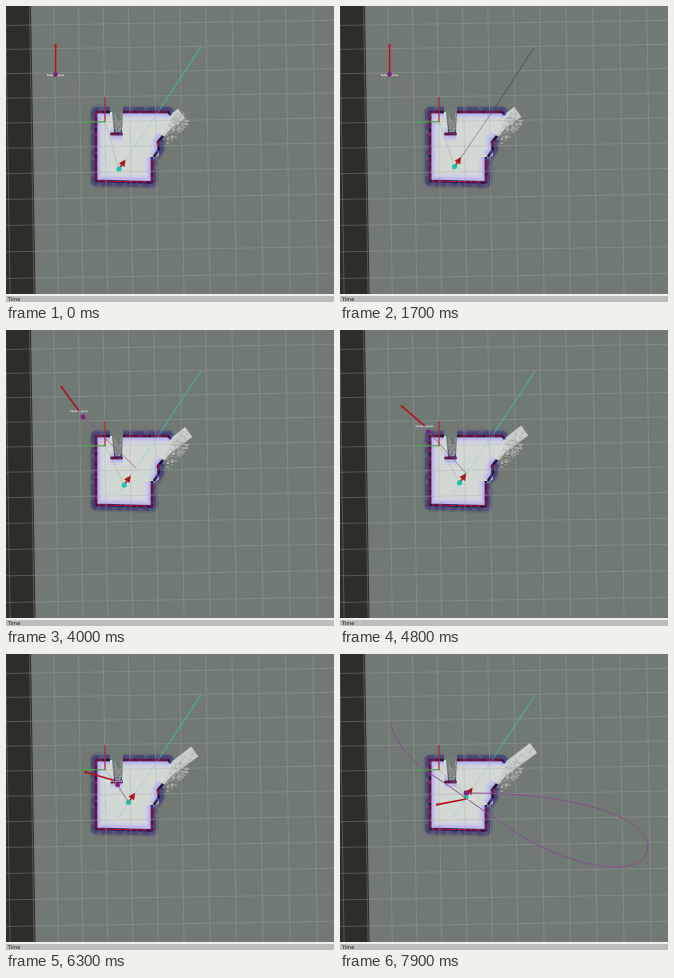
An HTML page with a canvas that plays this animation: 328x296 px, repeating every 8000 ms.

```html
<!DOCTYPE html>
<html lang="en">
<head>
<meta charset="utf-8">
<title>Robot map</title>
<style>
html, body { margin: 0; width: 100%; height: 100%; overflow: hidden; background: #707974; }
canvas { display: block; }
.bar {
  position: absolute; left: 0; top: 288px; width: 328px; height: 8px; box-sizing: border-box;
  overflow: hidden; background: #bdbdbc; border-top: 2px solid #f0f0ef;
  font: 5px/7px "DejaVu Sans", sans-serif; color: #111; padding-left: 2px;
}
</style>
</head>
<body>
<canvas id="view" width="328" height="296"></canvas>
<div class="bar">Time</div>
<script>
const LOOP = 8000, STEP = 100, TILT = 0.0157;
const ORIGIN = [99, 115.5];
const ctx = document.getElementById('view').getContext('2d');

// time, arrow base x/y, arrow angle in degrees, dot x/y, plan end x/y
const POSES = [
  [0, 49.5, 68.5, 270, 49.5, 68.5, 140, 121],
  [2000, 49.5, 68.5, 270, 49.5, 68.5, 140, 121],
  [2800, 56, 69, 257, 62, 75, 140, 122],
  [4000, 73, 81, 234, 77, 87, 130, 138],
  [5700, 97, 112, 206, 101, 118, 122, 150],
  [7000, 120, 143, 185, 124, 146, 124, 147],
  [7900, 126, 145, 169, 126, 139, 126, 143],
  [8000, 126, 145, 169, 126, 139, 126, 143]
];

const ROOM = new Path2D('M90 106H106L108 127H116L117 106H163L166 110L161 122L153 133L151 142L153 149L147 153V176L90 175Z');
const WALLS = new Path2D('M104 106H90V175L146 176.5V151M117 106H162L165 109M104.5 128H116.5M157 130L152 136L153 143L148 151');
const SCAN = new Path2D('M97 106H90V175L146 176V153M119 106H162M105 128H116M153 134L152 140');
const TOUR = new Path2D('M50 68C55 90 74 110 97 124C130 146 160 170 190 187C222 204 252 213 278 213C300 212 308 203 308 191C306 172 275 158 245 151C215 144 180 139 126 139');

function poseAt(t) {
  const i = Math.max(1, POSES.findIndex(p => p[0] > t));
  const a = POSES[i - 1], b = POSES[i], k = (t - a[0]) / (b[0] - a[0]);
  return a.map((v, j) => v + (b[j] - v) * k);
}

// Share of the robot's drive done; it gains speed gently.
const progress = t => (t / 7900) ** 1.35;

function seeded(seed) {
  return () => (seed = (seed * 16807) % 2147483647) / 2147483647;
}

function stroke(path, color, width, dash = []) {
  ctx.strokeStyle = color;
  ctx.lineWidth = width;
  ctx.setLineDash(dash);
  ctx.stroke(path);
  ctx.setLineDash([]);
}

function line(x1, y1, x2, y2, color, width = 1, dash) {
  const p = new Path2D();
  p.moveTo(x1, y1);
  p.lineTo(x2, y2);
  stroke(p, color, width, dash);
}

function polygon(color, ...points) {
  ctx.fillStyle = color;
  ctx.beginPath();
  points.forEach(p => ctx.lineTo(...p));
  ctx.fill();
}

function dot(x, y, r, color) {
  ctx.fillStyle = color;
  ctx.beginPath();
  ctx.arc(x, y, r, 0, 7);
  ctx.fill();
}

function arrow(x, y, angle, length, shaft, head, color) {
  ctx.save();
  ctx.translate(x, y);
  ctx.rotate(angle);
  line(0, 0, length - head, 0, color, shaft);
  polygon(color, [length, 0], [length - head, -head / 2], [length - head, head / 2]);
  ctx.restore();
}

function drawFloor() {
  ctx.fillStyle = '#707974';
  ctx.fillRect(0, 0, 328, 296);
  polygon('#2f2d2a', [0, 0], [25, 0], [29.5, 288], [0, 288]);
}

// Cells widen slightly to the right and bottom because of the camera.
function drawGrid() {
  const color = 'rgba(165,172,167,.42)';
  for (let i = -5; i < 10; i++) {
    const shift = 25 * i + 0.15 * i * i;
    const x = ORIGIN[0] + shift, y = ORIGIN[1] + shift;
    line(x - ORIGIN[1] * TILT, 0, x + (288 - ORIGIN[1]) * TILT, 288, color, 0.8);
    line(0, y + ORIGIN[0] * TILT, 328, y - (328 - ORIGIN[0]) * TILT, color, 0.8);
  }
}

// The seen part of the corridor lengthens as the robot drives.
function drawCorridor(t) {
  const k = progress(t), ex = 172 + 18 * k, ey = 102.5 - 13.5 * k;
  const rnd = seeded(71);
  for (let i = 0; i < 230; i++) {
    const u = rnd(), v = rnd();
    ctx.fillStyle = `rgba(${rnd() < 0.75 ? '200,205,203' : '95,102,99'},${0.2 + 0.45 * rnd()})`;
    ctx.fillRect(154 + u * 22 + v * 7, 128 - u * 22 + v * 11, 2, 1);
  }
  polygon('#c9cfcb', [150, 134], [160, 112], [ex, ey], [ex + 7, ey + 10], [166, 121.5], [153, 136]);
  for (let i = 0; i < 80; i++) {
    const u = rnd();
    ctx.fillStyle = 'rgba(140,147,143,.35)';
    ctx.fillRect(162 + u * (ex - 162) + rnd() * 7, 112 + u * (ey - 112) + rnd() * 10, 1.6, 0.8);
  }
}

function drawNotch() {
  const shade = ctx.createLinearGradient(0, 103, 0, 127);
  shade.addColorStop(0, '#707974');
  shade.addColorStop(1, '#969c9a');
  polygon(shade, [107, 103], [117, 103], [114.5, 126], [109.5, 126]);
  const rnd = seeded(19);
  for (let i = 0; i < 40; i++) {
    ctx.fillStyle = rnd() < 0.5 ? 'rgba(70,75,73,.4)' : 'rgba(190,195,193,.35)';
    ctx.fillRect(108 + rnd() * 7, 106 + rnd() * 18, 1, 1.6);
  }
}

function drawMap(t) {
  ctx.lineJoin = 'round';
  stroke(WALLS, 'rgba(70,68,115,.28)', 13);
  stroke(WALLS, 'rgba(66,60,128,.45)', 9);
  stroke(WALLS, 'rgba(48,42,100,.3)', 10, [6, 4, 11, 5]);
  drawCorridor(t);

  ctx.fillStyle = '#d2d8d4';
  ctx.fill(ROOM);
  ctx.save();
  ctx.clip(ROOM);
  stroke(WALLS, 'rgba(203,203,236,.55)', 15);
  stroke(WALLS, 'rgba(186,178,235,.75)', 9);
  ctx.restore();
  drawNotch();

  stroke(WALLS, 'rgba(60,40,125,.9)', 3);
  stroke(WALLS, '#17101f', 1.6, [9, 2, 5, 3]);
  stroke(SCAN, '#b80f2c', 1.1, [9, 1, 14, 2]);
}

function drawAxes() {
  line(99, 91, 99, 116, '#b3202a', 1.2);
  line(75, 115.8, 99, 115.8, '#3fa83b', 1.1);
}

function drawTarget(t) {
  const [, bx, by, deg, dx, dy, ex, ey] = poseAt(t);
  if (t > 2000 && t < 7000) line(dx, dy, ex, ey, 'rgba(135,70,140,.7)', 0.9);
  if (t >= 7100) stroke(TOUR, '#85508b', 1);
  line(dx, dy, ...ORIGIN, 'rgba(150,140,125,.5)', 0.7, [2, 1]);
  ctx.fillStyle = '#f0f2f0';
  ctx.font = 'bold 2.6px "DejaVu Sans", sans-serif';
  ctx.textAlign = 'center';
  ctx.fillText('target_pose', bx, by + 1.2);
  arrow(bx, by, deg * Math.PI / 180, 31.5, 1.6, 3.5, '#b3131c');
  dot(dx, dy, 2.4, '#7c1f7d');
}

function drawRobot(t) {
  const k = progress(t), x = 113 + 13 * k, y = 163 - 20 * k;
  line(...ORIGIN, x, y, 'rgba(140,135,120,.6)', 0.7, [2, 1]);
  arrow(x, y, -0.96, 11.5, 1.6, 6.8, '#ad1620');
  dot(x, y, 2.6, '#22c4a9');
}

function drawBeam(t) {
  const blue = t / STEP % 4 === 1;
  const [x, y] = blue ? [193.5, 42.5] : [195, 41];
  line(x, y, 154, 103, blue ? '#405868' : '#48b5b2', 1);
  line(154, 103, 112.5, 164, blue ? 'rgba(65,80,110,.6)' : 'rgba(110,205,205,.5)', 0.8);
}

function draw() {
  const t = Math.floor(performance.now() % LOOP / STEP) * STEP;
  drawFloor();
  drawMap(t);
  drawGrid();
  drawBeam(t);
  drawAxes();
  drawRobot(t);
  drawTarget(t);
  requestAnimationFrame(draw);
}
draw();
</script>
</body>
</html>
```
